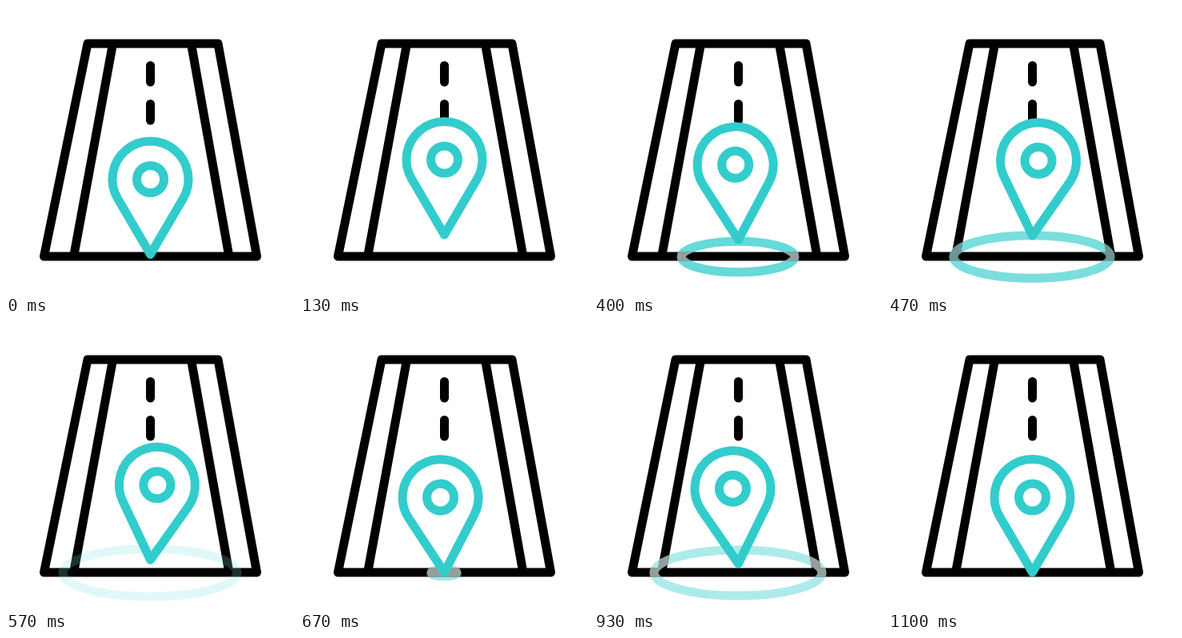
An HTML page that plays this animation: 360 by 360 pixels, repeating every 1.67 s.

```html
<!DOCTYPE html>
<html lang="en">
<head>
<meta charset="utf-8">
<title>Road pin</title>
<style>
  html, body { margin: 0; width: 100%; height: 100%; overflow: hidden; background: #fff; }
  svg { display: block; width: 100vw; height: 100vh; }
  svg * { fill: none; stroke-width: 11; stroke-linecap: round; stroke-linejoin: round; }
</style>
</head>
<body>
<svg viewBox="0 0 360 360">
  <defs>
    <path id="road" d="M102 47H265L313.5 313H47.5ZM133 50L85 311M232 50L278.5 311M180.5 74.5V95M180.5 122.5V143"/>
    <ellipse id="ring" cx="180" cy="313.5"/>
    <mask id="inRing" maskUnits="userSpaceOnUse" x="0" y="0" width="360" height="360">
      <use href="#ring" stroke="#fff"/>
    </mask>
  </defs>
  <use href="#road" stroke="#000"/>
  <g id="wave">
    <use href="#ring" stroke="#3cc"/>
  </g>
  <g mask="url(#inRing)">
    <use id="overlap" href="#road" stroke="#979d9d"/>
  </g>
  <g id="pin" stroke="#3cc">
    <path d="M0 0L-41 -70A47.5 47.5 0 1 1 41 -70Z"/>
    <circle cy="-94" r="17"/>
  </g>
</svg>
<script>
const LOOP = 1670, STEP = 100 / 3, LAST = 33;
const $ = id => document.getElementById(id);

const linear = p => p;
const smooth = p => (1 - Math.cos(Math.PI * p)) / 2;
const rise = p => Math.sin(Math.PI / 2 * p);
const fall = p => 1 - Math.cos(Math.PI / 2 * p);

// Each key: time, value, easing towards the next key
const lift = [[0, 2.5, smooth], [130, 27, fall], [267, 0], [300, 0, rise], [470, 26, fall],
              [640, 0], [670, 0, rise], [810, 22, fall], [930, 11], [1040, 0]];
const tilt = [[0, 0], [130, 0, smooth], [300, -14.5, smooth], [470, 4.6, rise], [530, 7, smooth],
              [670, -3, rise], [800, -7, smooth], [930, -4.3, smooth], [1070, 0]];
const waves = [
  { from: 233, to: 600,
    size: [[233, 0], [300, 32], [470, 98, rise], [560, 109]],
    fade: [[233, .95], [300, .88], [470, .65], [600, 0]],
    gray: [[300, 0], [400, 1], [600, 0]] },
  { from: 640, to: 1050,
    size: [[640, 0], [670, 16, rise], [930, 105], [1030, 109]],
    fade: [[640, .5], [670, .48], [930, .4], [1050, 0]],
    gray: [[640, 1], [930, 1], [1050, 0]] }
];

function at(keys, t) {
  if (t <= keys[0][0]) return keys[0][1];
  for (let i = 1; i < keys.length; i++) {
    const [t0, a, ease = linear] = keys[i - 1], [t1, b] = keys[i];
    if (t < t1) return a + (b - a) * ease((t - t0) / (t1 - t0));
  }
  return keys[keys.length - 1][1];
}

// Poses change on a grid rounded to 10 ms
const tick = k => Math.round(k * STEP / 10) * 10;

function draw(now) {
  const t = now % LOOP;
  let k = Math.min(LAST, Math.floor(t / STEP) + 1);
  while (tick(k) > t) k--;
  const time = tick(k);

  $('pin').setAttribute('transform',
    `translate(180.5 ${313 - at(lift, time)}) rotate(${at(tilt, time)})`);

  const wave = waves.find(w => time > w.from && time < w.to);
  const rx = wave ? at(wave.size, time) : 0;
  $('ring').setAttribute('rx', rx);
  $('ring').setAttribute('ry', rx * .272);
  $('wave').setAttribute('opacity', wave ? at(wave.fade, time) : 0);
  $('overlap').setAttribute('opacity', wave ? at(wave.gray, time) : 0);
}

const start = performance.now();
function loop() {
  draw(performance.now() - start);
  requestAnimationFrame(loop);
}
loop();
</script>
</body>
</html>
```
